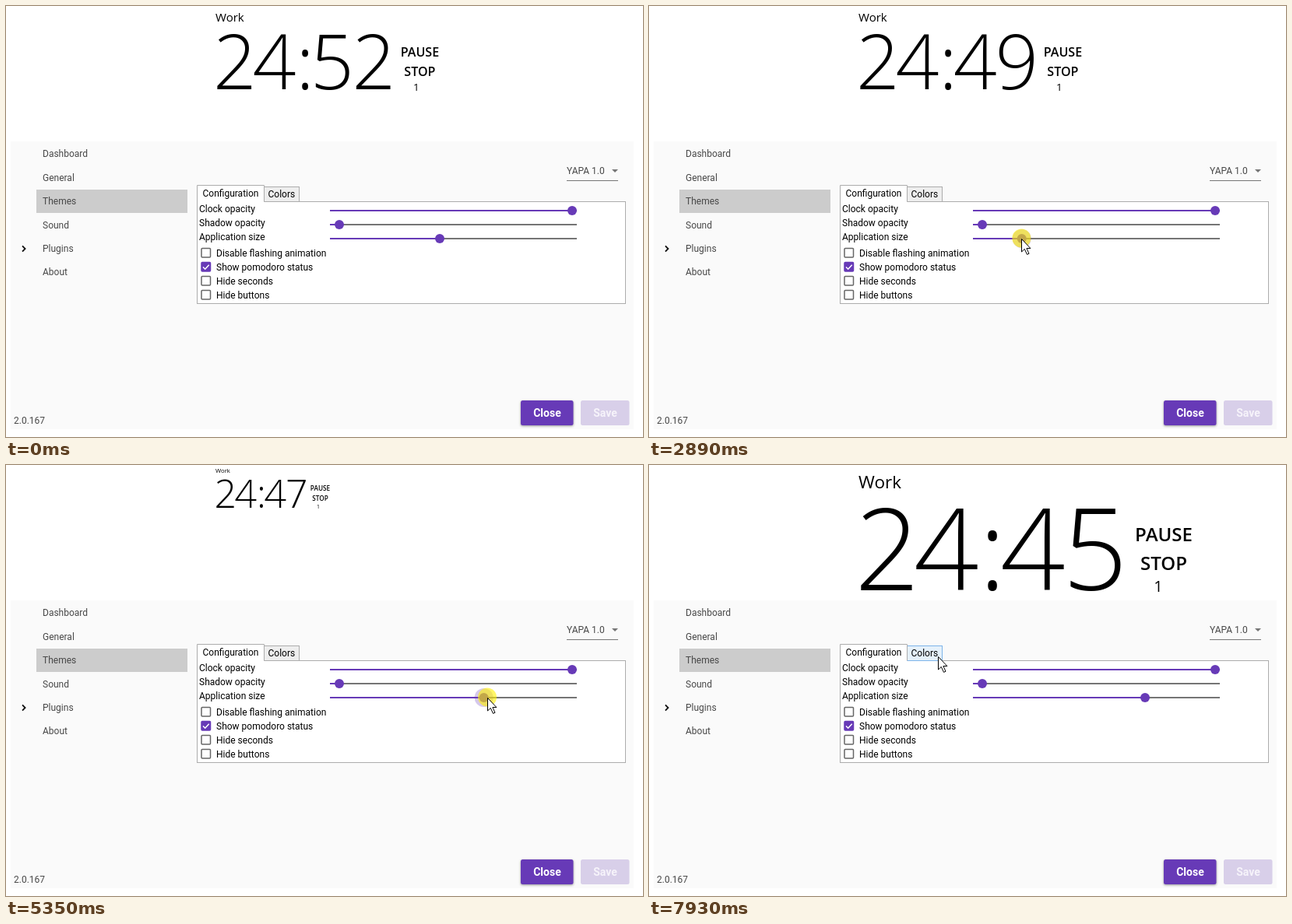
Recreate the animation shown at these times as an HTML page. Size 818 by 554 pixels, loop 8000 ms.

```html
<!DOCTYPE html>
<html lang="en">
<head>
<meta charset="utf-8">
<title>Timer settings</title>
<style>
  html, body { margin: 0; width: 100%; height: 100%; overflow: hidden; background: #fff; }
  svg { display: block; width: 818px; height: 554px; }
  text { font: 12px Roboto, sans-serif; fill: #000; }
  .muted text, text.muted { fill: #484848; }
  #clock text { font-family: "Open Sans", "Noto Sans", sans-serif; }
  #clock .digits {
    font: 300 146px "Noto Sans CJK JP Light", "Open Sans", "Noto Sans", sans-serif;
    text-anchor: middle;
  }
  #clock .status { font-size: 22.5px; }
  #clock .action { font-size: 24px; font-weight: 600; text-anchor: middle; }
  #clock .count { font-size: 20px; text-anchor: middle; }
  .button text { font-size: 14px; font-weight: 700; text-anchor: middle; }
  .raised { filter: drop-shadow(0 1px 1.5px #0006); }
  .frame { stroke: #acacac; }
  .hovered { fill: #e5f1fb; stroke: #7eb4ea; }
</style>
</head>
<body>
<svg viewBox="0 0 818 554">
  <g id="clock">
    <text class="status" y="30">Work</text>
    <text class="digits" id="digits" x="37 113 172 224 304" y="160.5">24:52</text>
    <text class="action" x="392" y="97.5">PAUSE</text>
    <text class="action" x="392" y="134.5">STOP</text>
    <text class="count" x="385" y="163">1</text>
  </g>

  <rect x="6" y="174" width="800" height="370" fill="#fafafa"/>
  <rect x="39" y="236" width="194" height="30" fill="#ccc"/>
  <g id="menu" class="muted"></g>
  <path d="M21 308.3l3.6 3.7-3.6 3.7" fill="none" stroke="#111" stroke-width="1.8"/>
  <text class="muted" x="10" y="537">2.0.167</text>

  <text class="muted" x="720" y="216">YAPA 1.0</text>
  <path d="M778 210h8l-4 4z" fill="#757575"/>
  <path d="M720 224.5h66" stroke="#777"/>

  <rect class="frame" x="245.5" y="251.5" width="550" height="131" fill="#fff"/>
  <rect class="frame" id="colorsTab" x="331.5" y="232.5" width="45" height="19" fill="#eee"/>
  <path class="frame" d="M245.5 252v-21.500h86v21" fill="#fff"/>
  <path d="M246 251.5h85" stroke="#fff"/>
  <text x="252.5" y="245">Configuration</text>
  <text x="336.5" y="246">Colors</text>

  <g id="options"></g>

  <g class="button">
    <rect class="raised" x="661" y="507" width="67.5" height="32" rx="2.5" fill="#673ab7"/>
    <text x="695" y="528" style="fill:#fff">Close</text>
    <rect x="738" y="507" width="62.5" height="32" rx="2.5" fill="#d8cfe9"/>
    <text x="769.5" y="528" style="fill:#f6f3fa">Save</text>
  </g>

  <circle id="press" r="12" fill="#fff000"/>
  <path id="cursor" d="M.5.5v16.500l3.800-3.600 3.200 7 2.500-1.100-3.100-6.800h5z" fill="#fff" stroke="#000"/>
</svg>
<script>
const LOOP = 8000;
const PURPLE = '#673ab7';
const $ = id => document.getElementById(id);

const label = (x, y, text) => `<text x="${x}" y="${y}">${text}</text>`;

const slider = (name, i, x) => {
  const y = 263 + 18 * i;
  return label(248, y + 2, name) + `
    <path d="M416 ${y}h317" stroke="#757575" stroke-width="2"/>
    <g id="slider${i}" fill="${PURPLE}">
      <path class="fill" d="M416 ${y}H${x}" stroke="${PURPLE}" stroke-width="2"/>
      <circle class="halo" cx="${x}" cy="${y}" r="12" opacity="0"/>
      <circle class="thumb" cx="${x}" cy="${y}" r="6"/>
    </g>`;
};

const checkbox = (name, i) => {
  const y = 311.5 + 18 * i, checked = i === 1;
  return label(270, y + 10.5, name) + `
    <rect x="251" y="${y}" width="11.5" height="11.5" rx="1" stroke-width="1.5"
      fill="${checked ? PURPLE : '#fff'}" stroke="${checked ? PURPLE : '#666'}"/>` +
    (checked ? `<path d="M253 ${y + 6}l2.7 2.7 5-5.5" fill="none" stroke="#fff" stroke-width="1.5"/>` : '');
};

$('menu').innerHTML = ['Dashboard', 'General', 'Themes', 'Sound', 'Plugins', 'About']
  .map((name, i) => label(47, Math.ceil(194 + 30.4 * i), name)).join('');
$('options').innerHTML =
  slider('Clock opacity', 0, 727) + slider('Shadow opacity', 1, 428) + slider('Application size', 2, 557) +
  ['Disable flashing animation', 'Show pomodoro status', 'Hide seconds', 'Hide buttons'].map(checkbox).join('');

const [fill, halo, thumb] = ['fill', 'halo', 'thumb'].map(c => $('slider2').querySelector('.' + c));

// Pointer moves; each one starts where the previous one ended.
const enter = { start: 260, end: 740, x: 650, y: 407 };
const approach = { start: 940, end: 1640, x: 557, y: 299 };
const shrink = { start: 1840, end: 3100, x: 478, y: 299 };
const grow = { start: 4640, end: 6040, x: 637, y: 299 };
const leave = { start: 7120, end: 7930, x: 371, y: 246 };
const drags = [shrink, grow];
const moves = [enter, approach, ...drags, leave];

const ramp = (t, start, end) => Math.min(1, Math.max(0, (t - start) / (end - start)));
const easeOut = p => 1 - (1 - p) ** 3;
const fade = (t, show, hide, length) => ramp(t, show, show + length) - ramp(t, hide, hide + length);

const follow = (path, from, t) => path.reduce((at, move) => {
  const p = easeOut(ramp(t, move.start, move.end));
  return { x: at.x + (move.x - at.x) * p, y: at.y + (move.y - at.y) * p };
}, from);

// The clock takes its new size only once a drag is released.
const clockScale = t => {
  const { x } = drags.filter(drag => t >= drag.end).pop() || approach;
  return 1 + (x - grow.x) / 242;
};
const secondsLeft = t => 52 - Math.floor((t - 740) / 1071 + 1);

function draw(t) {
  $('clock').setAttribute('transform', `translate(269 0) scale(${clockScale(t)})`);
  $('digits').textContent = '24:' + secondsLeft(t);

  const thumbX = follow(drags, approach, t - 50).x;
  fill.setAttribute('d', `M416 299H${thumbX}`);
  halo.setAttribute('cx', thumbX);
  thumb.setAttribute('cx', thumbX);
  halo.setAttribute('opacity', .28 * fade(t, 1500, 7170, 140));

  const { x, y } = follow(moves, { x: 760, y: 533 }, t);
  $('cursor').setAttribute('transform', `translate(${Math.round(x)} ${Math.round(y)})`);
  $('cursor').setAttribute('visibility', t < enter.start ? 'hidden' : 'visible');

  const pressed = drags.reduce((sum, drag) => sum + fade(t, drag.start - 70, drag.end - 100, 70), 0);
  $('press').setAttribute('transform', `translate(${x} ${y - .5})`);
  $('press').setAttribute('opacity', .6 * pressed);

  $('colorsTab').classList.toggle('hovered', x < 377 && y < 252);
}

const start = performance.now();
function frame() {
  draw((performance.now() - start) % LOOP);
  requestAnimationFrame(frame);
}
frame();
</script>
</body>
</html>
```
